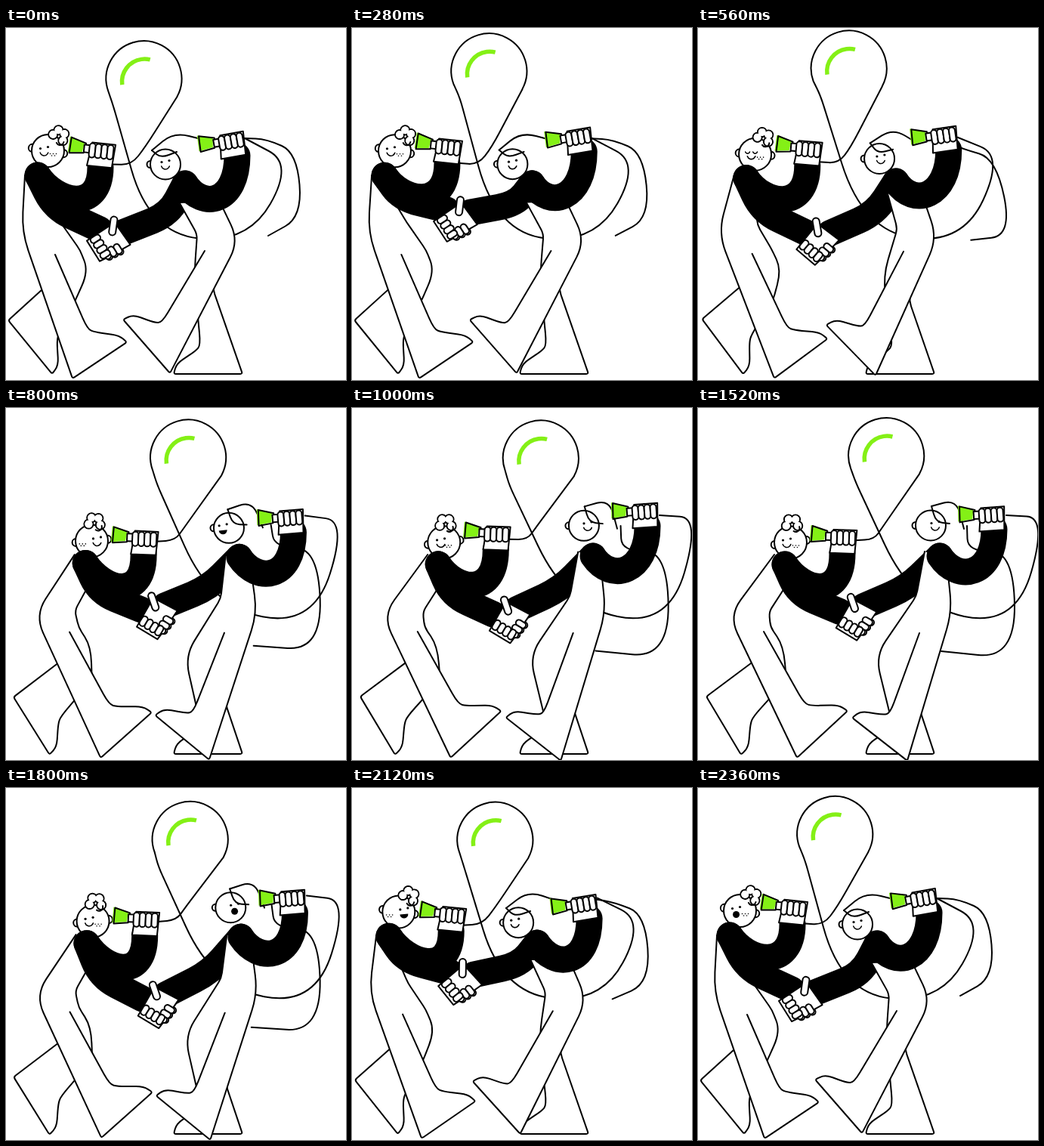
These frames come from a looping animation (450 px wide and 466 px high, 2400 ms). An HTML page with a canvas:

```html
<!DOCTYPE html>
<html lang="en">
<head>
<meta charset="utf-8">
<title>Handshake</title>
<style>
html, body { margin: 0; width: 100%; height: 100%; overflow: hidden; background: #fff; }
canvas { display: block; }
</style>
</head>
<body>
<canvas id="stage" width="450" height="466"></canvas>
<script>
const ctx = document.getElementById('stage').getContext('2d');
const LOOP = 2400, STEP = 40, INK = '#000', PAPER = '#fff', GREEN = '#84f016';
const RAD = Math.PI / 180;
const SOFT = 999; // corner cut long enough to turn a polyline into a smooth curve

let sway = 0; // 0 = leaning left, 1 = leaning right
const mix = (a, b, k = sway) => a + (b - a) * k;
const joint = (x, y, dx, dy, r = 7) => [x + dx * sway, y + dy * sway, r];
const shift = ([x, y], dx, dy) => [x + dx, y + dy, 0];
const quart = u => u <= 0 ? 0 : u >= 1 ? 1 : u < .5 ? 8 * u ** 4 : 1 - 8 * (1 - u) ** 4;
const swayAt = t => quart((t - 32) / 1200) - quart((t - 1465) / 977);
const wave = (t, phase) => Math.sin((t * 360 * 7 / LOOP + phase) * RAD);
const within = (t, a, b) => t >= a && t < b;
const glance = (t, middle) => Math.cos(Math.min(Math.abs(t - middle) / 240, 1) * Math.PI) / 2 + .5;

function traceOn(points) {
  points.forEach(([x, y, r], i) => {
    const prev = points[i - 1], next = points[i + 1];
    if (!prev || !next) return ctx.lineTo(x, y);
    const toward = p => {
      const d = Math.hypot(p[0] - x, p[1] - y) || 1, k = Math.min(r / d, .5);
      return [x + (p[0] - x) * k, y + (p[1] - y) * k];
    };
    ctx.lineTo(...toward(prev));
    ctx.quadraticCurveTo(x, y, ...toward(next));
  });
}
function stroke(width = 2, color = INK) {
  ctx.lineWidth = width;
  ctx.strokeStyle = color;
  ctx.stroke();
}
function fill(color) {
  ctx.fillStyle = color;
  ctx.fill();
}
function shape(points, color) {
  ctx.beginPath();
  traceOn(points);
  if (color) fill(color);
  stroke();
}
function polygon(points, color, outlined = true) {
  ctx.beginPath();
  points.forEach(p => ctx.lineTo(...p));
  ctx.closePath();
  if (color) fill(color);
  if (outlined) stroke();
}
function disc(x, y, r, color = PAPER, outlined = true) {
  ctx.beginPath();
  ctx.arc(x, y, r, 0, 7);
  fill(color);
  if (outlined) stroke();
}
function pill(x, y, w, h) {
  ctx.beginPath();
  ctx.roundRect(x, y, w, h, Math.min(w, h) / 2);
  fill(PAPER);
  stroke();
}
function at(x, y, degrees, draw) {
  ctx.save();
  ctx.translate(x, y);
  ctx.rotate(degrees * RAD);
  draw();
  ctx.restore();
}

// One shoe outline for every leg, scaled and turned by its sole.
function foot(heel, toe, arch) {
  const ux = toe[0] - heel[0], uy = toe[1] - heel[1], up = Math.sign(ux);
  const spot = (along, high, r) =>
    [heel[0] + ux * along + uy * up * high, heel[1] + uy * along - ux * up * high, r];
  return [spot(.61, arch, 16), spot(.68, arch * .8, 10), spot(.96, .15, 10), spot(1, 0, 3), spot(0, 0, 3)];
}
const leg = (front, heel, toe, back, arch) =>
  shape([...front, ...foot(heel, toe, arch), ...back], PAPER);

function bentArm(shoulder, wrist) {
  ctx.beginPath();
  ctx.moveTo(...shoulder.slice(0, 2));
  ctx.bezierCurveTo(shoulder[0] + 24, shoulder[1] + 36, wrist[0], wrist[1] + 62, wrist[0], wrist[1]);
  stroke(35);
}
function reachingArm(shoulder, wrist, bend) {
  const elbow = [mix(shoulder[0], wrist[0], .5) + bend, mix(shoulder[1], wrist[1], .5) + 8, 24];
  ctx.beginPath();
  traceOn([shoulder, elbow, wrist]);
  stroke(35);
}

function balloon(x, y, cordY) {
  ctx.beginPath();
  traceOn([[mix(139, 208), cordY, 0], joint(166, 181, 67, -7, 16), joint(184, 158, 60, 0, 24), [x + 44, y + 24]]);
  ctx.arc(x, y, 50, 28 * RAD, 160 * RAD, true);
  traceOn([
    [x - 47, y + 17], [mix(142, 209), y + 36, 14], joint(190, 272, 95, -10, SOFT),
    joint(320, 285, 100, 5, SOFT), joint(380, 180, 82, -35, SOFT), joint(316, 146, 92, -4)
  ]);
  stroke();
  ctx.lineCap = 'butt';
  ctx.beginPath();
  ctx.arc(x + 1, y + 4, 30, 172 * RAD, 284 * RAD);
  stroke(5.5, GREEN);
  ctx.lineCap = 'round';
}

function looseCord(t) {
  const lag = t < 1200 ? 5.7 * sway * (1 - sway) ** 2 : 0;
  shape([
    joint(316, 146, 40, 10), joint(345, 147, 12, 43, SOFT), joint(385, 165, 33, 25, SOFT),
    joint(392 + 18 * lag, 250, 28, 82, SOFT), joint(347 + 26 * lag, 275 - 10 * lag, -25, 47)
  ]);
}

function phoneHand(x, y, angle) {
  at(x, y, angle, () => {
    const horn = [[-41, -15], [-21, -9], [-23, 4], [-42, 6]];
    polygon(horn.map(([px, py]) => [px - 2, py - 1]), GREEN, false);
    polygon(horn);
    polygon([[-23, -7], [-14, -7], [-14, 3], [-23, 3]], PAPER);
    polygon([[-13, -11], [18, -11], [16, 20], [-17, 20]], PAPER);
    for (let i = 0; i < 4; i++) pill(-16 + 8 * i, -10, 8, 19);
  });
}

function claspedHands(x, y, angle) {
  at(x, y, angle, () => {
    for (let i = 0; i < 3; i++) pill(10 - i, -8 + 8 * i, 15, 8);
    polygon([[-16, -18], [20, -20], [18, 17], [17, 26], [-15, 26]], PAPER);
    for (let i = 0; i < 3; i++) pill(9 - i, -7 + 8 * i, 14, 8);
    for (let i = 0; i < 4; i++) pill(-15 + 8 * i, 8, 8, 14);
    at(-20, -19, 40, () => pill(-4, -5, 25, 9));
  });
}

function face(x, y, mouth, blink) {
  for (const side of [-5, 5]) {
    if (blink) {
      ctx.beginPath();
      ctx.arc(x + side, y - 5, 3, .3, Math.PI - .3);
      stroke(1.5);
    } else disc(x + side, y - 5 - side * .2, 1.6, INK, false);
  }
  ctx.beginPath();
  if (mouth === 'smile') {
    ctx.arc(x, y, 5.5, .3, Math.PI - .3);
    stroke(1.6);
  } else if (mouth === 'laugh') {
    ctx.arc(x, y + 2, 5.5, -.1, Math.PI - .1);
    fill(INK);
  } else disc(x, y + 4, 4.5, INK, false);
}

function curls() {
  const bumps = [0, 1, 2, 3].map(i => (165 + 70 * i) * RAD)
    .map(a => [2 + 8 * Math.cos(a), -24 + 8 * Math.sin(a)]);
  bumps.forEach(([x, y]) => disc(x, y, 6));
  bumps.forEach(([x, y]) => disc(x, y, 5, PAPER, false));
  ctx.beginPath();
  ctx.arc(7, -19, 5, -.4, 2.2);
  stroke();
}

function leftHead(t) {
  const [x, y] = joint(55.5, 162.5, 67, 15.5);
  const turn = -5 + 12 * (glance(t, 800) + glance(t, 2120));
  at(x, y, mix(10, -8), () => { disc(-21, 0, 5); disc(21, 0, 5); });
  disc(x, y, 21.5);
  at(x, y, mix(32, 0), curls);
  const mouth = within(t, 2000, 2240) ? 'laugh' : within(t, 2280, 2400) ? 'o' : 'smile';
  face(x + turn, y + 1, mouth, within(t, 480, 640));
  for (let i = 0; i < 5; i++)
    disc(x - 1 - 1.6 * turn + (i - 2) * 2, y + 4 + i % 2 * 2.5, .8, INK, false);
}

function rightHead(t) {
  const [x, y] = joint(211, 180.5, 97, -25);
  const parting = joint(193, 162, 116, -32);
  disc(x - 20, y, 4.5);
  shape([parting, joint(222, 138, 120, -17, SOFT), joint(262, 148, 90, 12)]);
  disc(x, y, 20);
  shape([parting, joint(205, 172, 110, -21, SOFT), joint(226, 164, 107, -11)]);
  const turn = 6 * sway - 13 * glance(t, 800) - 5 * glance(t, 2120);
  const mouth = within(t, 680, 960) ? 'laugh' : within(t, 1720, 1920) ? 'o' : 'smile';
  face(x + turn, y + 1, mouth, false);
}

function draw(t) {
  sway = swayAt(t);
  const bounce = 1.5 + 5.5 * wave(t, 3);
  const bob = wave(t, 48);
  const leftHand = joint(126, 162 + bounce, 66, 7), rightHand = joint(298, 149 + bounce, 90, -10);
  const clasp = joint(137, 281, 72, 7);
  clasp[1] -= mix(13.5, 6) * (1 - Math.cos((360 * 4 * t / LOOP + 15) * RAD));
  const leftShoulder = joint(42, 195, 73, 12), rightShoulder = joint(237, 206, 83, -10);
  const rightBack = joint(283, 230, 46, -30);

  ctx.fillStyle = PAPER;
  ctx.fillRect(0, 0, 450, 466);
  ctx.lineCap = ctx.lineJoin = 'round';

  balloon(mix(181, 250) + 2 * bob, mix(60, 65) + mix(9.5, 4.7) * bob, mix(180, 174) + bounce / 3);
  looseCord(t);

  leg([joint(60, 238, 56, -2), joint(72, 257, 22, 13), joint(98, 294, -2, -4), joint(109, 322, 4, -7, 24), joint(92, 360, 25, 0)],
    joint(3, 387, 8, -5), joint(61, 458, -4, 1), [joint(47, 347, 23, -9)], .44);
  leg([joint(65, 300, 22, -4)], joint(88, 464, 43, -1), joint(160, 416, 38, -15),
    [joint(21, 270, 20, 5, 26), joint(25, 195, 76, -1)], .5);

  reachingArm(rightShoulder, shift(clasp, mix(18, 10), mix(-10, -14)), mix(20, 8));
  leg([joint(230, 232, 70, -42), joint(253, 273, 36, -24), joint(249, 330, -14, -2, 24)],
    joint(313, 458, 0, 0), joint(222, 458, 0, 0), [joint(274, 346, 19, 52), rightBack], .42);
  leg([joint(263, 295, 30, 3)], joint(217, 457, 60, 10), joint(155, 386, 49, 24),
    [joint(308, 282, 28, -12, 24), rightBack], .38);

  leftHead(t);
  reachingArm(leftShoulder, shift(clasp, mix(-13, -21), mix(-14, -7)), -19);
  bentArm(leftShoulder, shift(leftHand, -1, 20));
  bentArm(rightShoulder, shift(rightHand, mix(8, 4), 18));
  rightHead(t);

  phoneHand(leftHand[0], leftHand[1], mix(6, 2));
  phoneHand(rightHand[0], rightHand[1], mix(-10, -4));
  claspedHands(clasp[0], clasp[1], 31 + 27 * (1 - sway) ** 3);
}

function tick() {
  const t = performance.now() % LOOP;
  draw(Math.floor(t / STEP) * STEP);
  requestAnimationFrame(tick);
}
tick();
</script>
</body>
</html>
```
